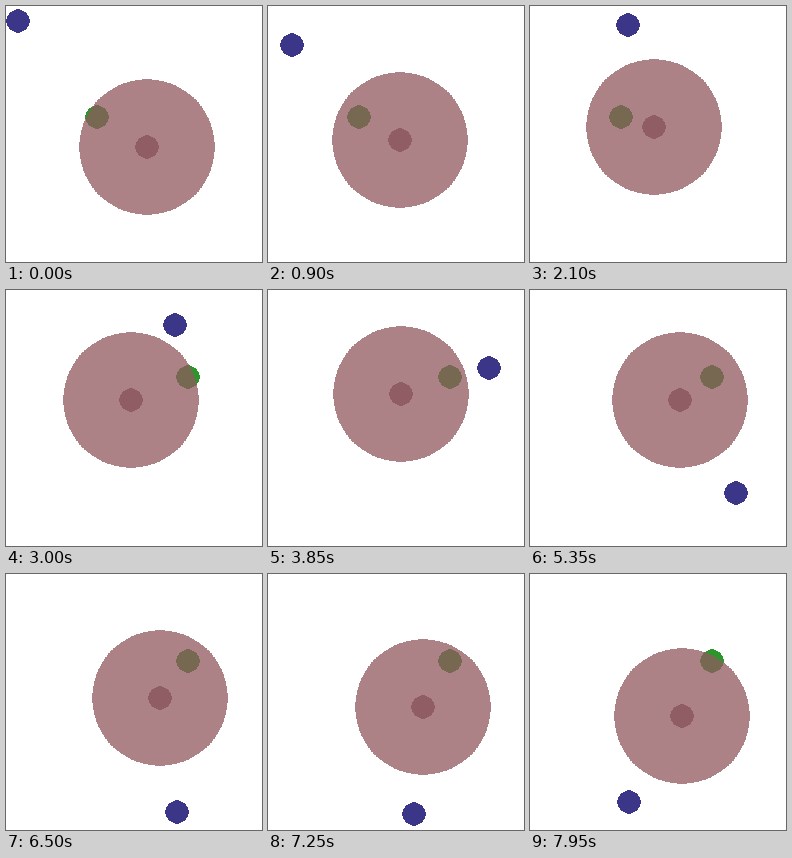
Animation, 256 px wide and 256 px high, one loop 8 s. Source, as an HTML page with a canvas:

```html
<!DOCTYPE html>
<html lang="en">
<head>
<meta charset="utf-8">
<title>Puck chase</title>
<style>
  html, body { margin: 0; width: 100%; height: 100%; overflow: hidden; background: #fff; }
  canvas { display: block; width: 100%; height: 100%; image-rendering: pixelated; }
</style>
</head>
<body>
<canvas id="stage" width="256" height="256"></canvas>
<script>
const ctx = document.getElementById('stage').getContext('2d');
const LOOP = 8000, STEP = 50, GOAL_JUMP = 2450;
const SMALL = 12, LARGE = 68;
const HUNTER_SPEED = 0.64;

// Turning points of the puck: time, x, y
const route = [
  [0, 12, 15], [450, 16, 34], [900, 24, 39], [1500, 53, 33],
  [2100, 98, 19], [2700, 148, 24], [3850, 221, 78], [4400, 232, 124],
  [5100, 221, 183], [5350, 206, 203], [5950, 180, 230], [6500, 171, 238],
  [7250, 146, 240], [7950, 99, 228]
];

function slope(i, col) {
  const a = route[Math.max(i - 1, 0)];
  const b = route[Math.min(i + 1, route.length - 1)];
  return (b[col] - a[col]) / (b[0] - a[0]);
}

// Smooth cubic through the turning points.
function puckAt(t) {
  let i = 0;
  while (i < route.length - 2 && route[i + 1][0] <= t) i++;
  const a = route[i], b = route[i + 1];
  const d = b[0] - a[0], u = (t - a[0]) / d, v = 1 - u;
  return [1, 2].map(col =>
    a[col] * v * v * (1 + 2 * u) + b[col] * u * u * (3 - 2 * u) +
    d * u * v * (slope(i, col) * v - slope(i + 1, col) * u));
}

// The hunter heads for the puck at constant speed.
function simulate() {
  const steps = [];
  let x = 141.1, y = 141.15;
  for (let t = 0; t < LOOP; t += STEP) {
    const puck = puckAt(t);
    steps.push({ puck, hunter: [x, y] });
    const dx = puck[0] - x, dy = puck[1] - y;
    const k = HUNTER_SPEED / Math.hypot(dx, dy);
    x += dx * k;
    y += dy * k;
  }
  return steps;
}

// Half-width of each pixel row, from an integer circle stepper.
function discRows(r) {
  const rows = [];
  let ix = 0, iy = r * 64, h, i;
  do {
    h = (ix + 8) >> 6;
    i = (iy + 8) >> 6;
    if (i < r && rows[i] === undefined) rows[i] = h;
    if (rows[h] === undefined) rows[h] = i;
    ix += Math.floor(iy / r);
    iy -= Math.floor(ix / r);
  } while (i > h);
  for (let k = 0; k < r; k++) {
    if (rows[k] === undefined) rows[k] = rows[k - 1];
  }
  return rows;
}

const steps = simulate();
const smallRows = discRows(SMALL), largeRows = discRows(LARGE);

function disc(center, rows, color) {
  const [x, y] = center.map(Math.round);
  ctx.fillStyle = color;
  rows.forEach((w, k) => {
    ctx.fillRect(x - w, y - k - 1, 2 * w, 1);
    ctx.fillRect(x - w, y + k, 2 * w, 1);
  });
}

function draw(t) {
  const { puck, hunter } = steps[Math.floor(t / STEP)];
  const goal = t < GOAL_JUMP ? [91, 111] : [182, 87];

  ctx.fillStyle = '#fff';
  ctx.fillRect(0, 0, 256, 256);
  disc(puck, smallRows, 'rgb(60, 54, 137)');
  disc(goal, smallRows, 'rgb(44, 150, 44)');
  disc(hunter, largeRows, 'rgba(144, 88, 94, 0.75)');
  disc(hunter, smallRows, 'rgb(144, 93, 100)');
}

const start = performance.now();
function tick() {
  draw((performance.now() - start) % LOOP);
  requestAnimationFrame(tick);
}
tick();
</script>
</body>
</html>
```
